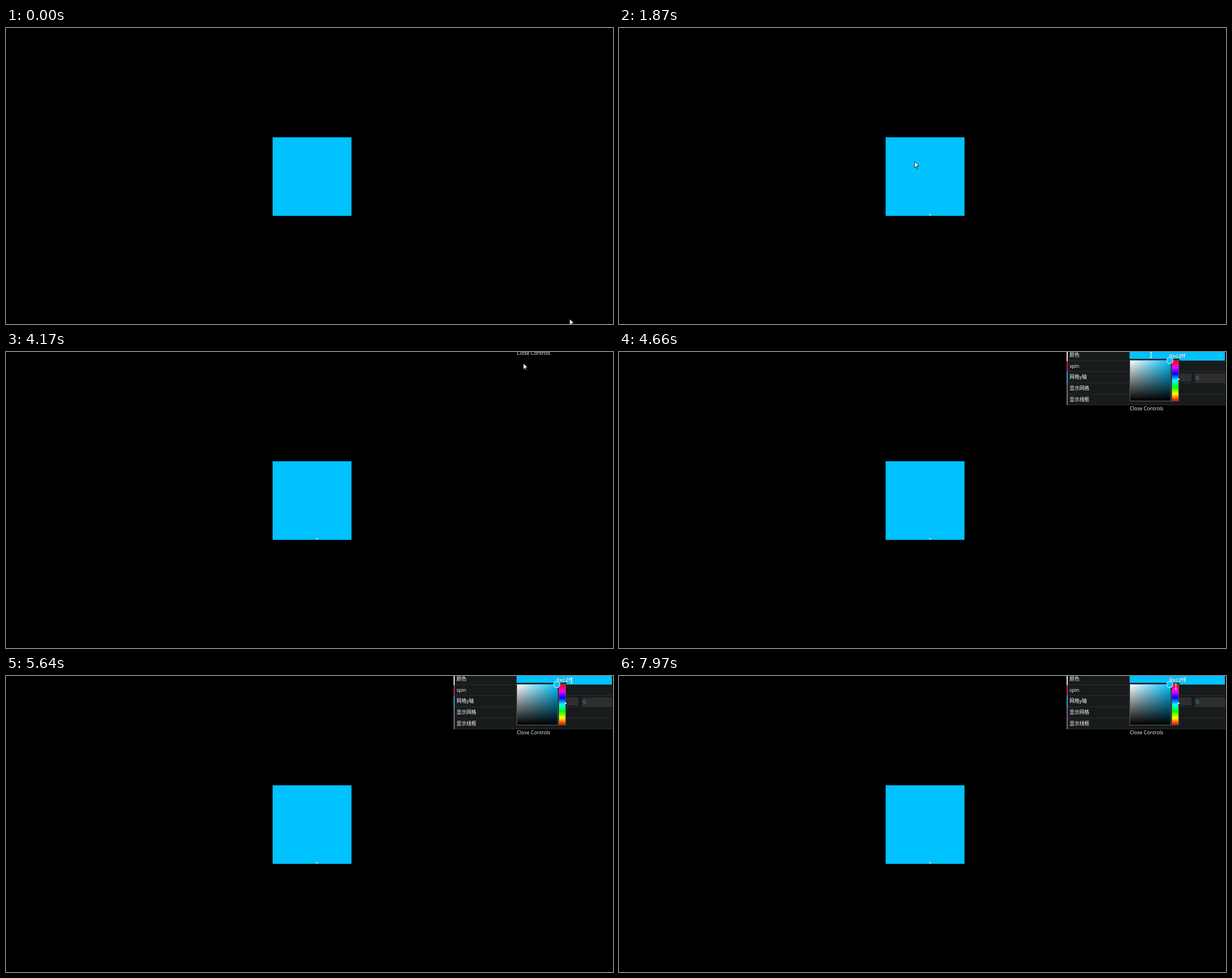
Recreate the animation shown at these times as an HTML page without scripts. Size 1070 by 523 pixels, loop 8000 ms.

```html
<!DOCTYPE html>
<html lang="zh">
<head>
<meta charset="utf-8">
<title>Cube controls</title>
<style>
  html, body { margin: 0; width: 100%; height: 100%; overflow: hidden; background: #000; }
  .stage { position: relative; width: 1070px; height: 523px; overflow: hidden; background: #000;
    font: 8.7px/19px "Open Sans", "Noto Sans CJK SC", "Noto Sans CJK", sans-serif; color: #fff; }
  .stage div { position: absolute; box-sizing: border-box; }
  .cube { left: 470px; top: 193px; width: 139px; height: 139px; background: #00c2ff;
    box-shadow: inset 0 1px #00aee5, inset 0 -1px #00aee5; }

  /* control panel */
  .stage .panel { left: 789px; top: -4px; width: 280px; }
  .stage .row { position: relative; height: 0; overflow: hidden; padding-left: 3.3px;
    border-left: 2px solid var(--edge); background: #181b1b; box-shadow: inset 0 -1px #2b2d2d;
    white-space: nowrap; animation: grow 8s infinite ease-out; }
  .stage .close { position: relative; height: 13.3px; line-height: 13.4px; padding-left: 2px;
    font-size: 8.8px; font-weight: 500; text-align: center;
    animation: label 8s infinite step-end, hover 8s infinite step-end; }
  .field { left: 109px; top: 0; width: 168px; height: 18.5px; background: #00c2ff;
    font: bold 9.6px/21px "Liberation Sans", sans-serif; text-align: center;
    text-shadow: 0 0 1px rgba(0, 0, 0, .7); }
  .slider { left: 109px; top: 3px; width: 109px; height: 14px; background: #2e2e2e; }
  .number { left: 223.5px; top: 3px; width: 54px; height: 15.5px; padding-left: 2.5px;
    background: #2e2e2e; color: #2fa1d6; font-size: 9.5px; line-height: 15px; }

  /* colour picker */
  .picker { left: 899px; top: 12px; width: 89px; height: 76px; background: #222;
    animation: picker 8s infinite step-end; }
  .shade, .hue { top: 2px; height: 73px; border: 1px solid #555; }
  .shade { left: 1px; width: 73px;
    background: linear-gradient(transparent, #000), linear-gradient(90deg, #fff, #00c2ff); }
  .hue { left: 75px; width: 13px;
    background: linear-gradient(#f00, #f0f, #00f, #0ff, #0f0, #ff0, #f00); }
  .mark { left: 86px; top: 35px; width: 3px; height: 2px; background: #fff; }
  .knob { left: 66.2px; top: -2.8px; width: 11.6px; height: 11.6px; border-radius: 50%;
    border: 1.5px solid #fff; background: #00c2ff; }

  svg { position: absolute; left: 0; top: 0; }
  .arrow { animation: arrow 8s infinite linear, arrow-show 8s infinite step-end; }
  .beam { animation: beam 8s infinite linear, beam-show 8s infinite step-end; }
  .click { animation: click 8s infinite step-end; }
  .caret { animation: caret 8s infinite step-end; }
  .smear { animation: smear 8s infinite step-end; }
  .trace { animation: trace 8s infinite step-end; }

  @keyframes grow { 0%, 56.1% { height: 0; } 57.4%, 100% { height: 19.7px; } }
  @keyframes label { 0% { opacity: 0; } 42.37%, 100% { opacity: 1; } }
  @keyframes hover { 0% { background: #000; } 53.2% { background: #111; } 56.1%, 100% { background: #000; } }
  @keyframes picker { 0% { opacity: 0; } 57.6%, 100% { opacity: 1; } }
  @keyframes arrow-show { 0% { opacity: 1; } 57.6%, 100% { opacity: 0; } }
  @keyframes beam-show { 0% { opacity: 0; } 57.6%, 100% { opacity: 1; } }
  @keyframes click { 0% { opacity: 0; } 82% { opacity: 1; } 84.4%, 100% { opacity: 0; } }
  @keyframes caret { 0% { opacity: 0; } 82%, 100% { opacity: 1; } }
  @keyframes smear { 0% { opacity: 0; } 3%, 100% { opacity: 1; } }
  @keyframes trace { 0% { opacity: 0; } 46.2%, 100% { opacity: 1; } }

  @keyframes arrow {
    0%, .25% { transform: translate(993.5px, 514px); }
    3% { transform: translate(547px, 326px); }
    3.9% { transform: translate(454px, 287px); }
    5.6%, 7.5% { transform: translate(514px, 236px); }
    7.6% { transform: translate(512px, 227px); }
    8.6%, 23.36% { transform: translate(521px, 233px); }
    23.37%, 27.5% { transform: translate(521px, 236px); }
    33.4%, 38.2% { transform: translate(539px, 223px); }
    39% { transform: translate(530px, 214px); }
    39.9%, 46.1% { transform: translate(539.5px, 223px); }
    52.1%, 52.5% { transform: translate(912px, 20px); }
    54.1%, 100% { transform: translate(930px, 2px); }
  }
  @keyframes beam {
    0%, 57.6% { transform: translate(930px, 4px); }
    62.7%, 66.4% { transform: translate(991.5px, 15.5px); }
    67.6%, 70.5% { transform: translate(997px, 8px); }
    73.9%, 76.7% { transform: translate(1010px, 9px); }
    78% { transform: translate(1016px, 9px); }
    82%, 88.1% { transform: translate(940.5px, 5px); }
    90.7%, 92.7% { transform: translate(1008px, 8px); }
    95.6%, 98.5% { transform: translate(1014px, 9px); }
    99.6%, 100% { transform: translate(981.5px, 18.5px); }
  }
</style>
</head>
<body>
<div class="stage">
  <div class="cube"></div>

  <div class="panel">
    <div class="row" style="--edge:#e6e6e6">颜色<div class="field">0xc2ff</div></div>
    <div class="row" style="--edge:#c8225a">spin</div>
    <div class="row" style="--edge:#2fa1d6">网格y轴<div class="slider"></div><div class="number">0</div></div>
    <div class="row" style="--edge:#806787">显示网格</div>
    <div class="row" style="--edge:#806787">显示线框</div>
    <div class="close">Close Controls</div>
  </div>

  <div class="picker">
    <div class="shade"></div>
    <div class="hue"></div>
    <div class="mark"></div>
    <div class="knob"></div>
  </div>

  <svg width="1070" height="523" fill="none">
    <path class="smear" d="M547 327.5l4 4h-4z" fill="#b9d3dc"/>
    <path class="trace" d="M540 233l3 2M545.500 229v5M542 236h2" stroke="#0090c8" stroke-opacity=".25"/>
    <path class="caret" d="M998.500 1.500v10" stroke="#eaf6fb" stroke-opacity=".7"/>
    <g class="arrow">
      <path d="M0 0V17L4 13L6.500 19L9 18L6.500 12H12Z" transform="scale(.64)" fill="#fff" stroke="#000" stroke-width="1.300"/>
    </g>
    <g class="beam">
      <path d="M-2 -4.500H2M0 -4.500V4.500M-2 4.500H2" stroke="#fff"/>
      <g class="click">
        <circle r="8.500" fill="#86d880"/>
        <path d="M-2 -4.500H2M0 -4.500V4.500M-2 4.500H2" stroke="#e8a02c"/>
      </g>
    </g>
  </svg>
</div>
</body>
</html>
```
